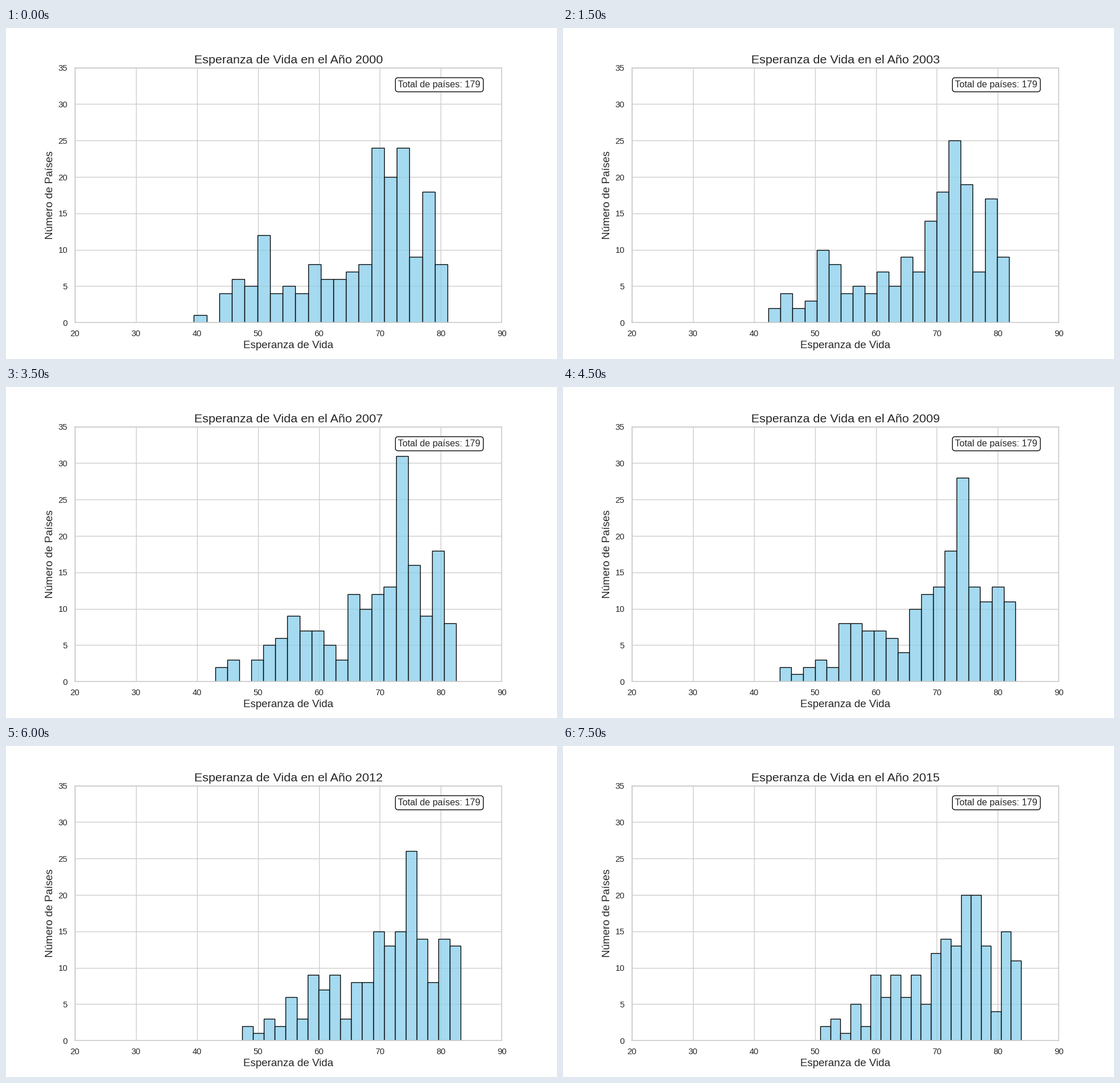
These frames come from a looping animation (966x580 px, 8 s). A matplotlib script:

```python
import matplotlib.pyplot as plt
import numpy as np
from matplotlib.animation import FuncAnimation

WIDTH, HEIGHT, DPI = 966, 580, 96
PT = WIDTH / 10 / DPI  # sizes are given in points for a 10 inch wide chart
FIRST_YEAR, YEARS, BINS, INTERVAL = 2000, 16, 20, 500
INK, GRID = "0.15", "0.8"

# Countries per bin in the surveyed years; the years between are blended.
COUNTS = {
    2000: [1, 0, 4, 6, 5, 12, 4, 5, 4, 8, 6, 6, 7, 8, 24, 20, 24, 9, 18, 8],
    2002: [1, 5, 2, 3, 11, 8, 3, 6, 3, 8, 5, 8, 7, 14, 19, 25, 18, 7, 19, 7],
    2005: [3, 2, 2, 4, 7, 8, 7, 4, 5, 6, 4, 12, 7, 12, 18, 23, 21, 7, 15, 12],
    2007: [2, 3, 0, 3, 5, 6, 9, 7, 7, 5, 3, 12, 10, 12, 13, 31, 16, 9, 18, 8],
    2009: [2, 1, 2, 3, 2, 8, 8, 7, 7, 6, 4, 10, 12, 13, 18, 28, 13, 11, 13, 11],
    2012: [2, 1, 3, 2, 6, 3, 9, 7, 9, 3, 8, 8, 15, 13, 15, 26, 14, 8, 14, 13],
    2015: [2, 3, 1, 5, 2, 9, 6, 9, 6, 9, 5, 12, 14, 13, 20, 20, 13, 4, 15, 11],
}
LOWEST = [39.5, 40.5, 41.5, 42.4, 42.4, 42.5, 42.8, 43.0,
          43.5, 44.2, 45.3, 46.4, 47.4, 48.8, 50.0, 50.9]
HIGHEST = [81.1, 81.4, 81.6, 81.8, 82.0, 81.9, 82.3, 82.5,
           82.6, 82.9, 82.8, 82.6, 83.2, 83.4, 83.6, 83.8]

surveyed = list(COUNTS)
cumulative = np.cumsum(list(COUNTS.values()), axis=1)
total = cumulative[0, -1]


def histogram(year):
    """Return bin edges and counts; blending running totals keeps the sum."""
    running = [round(np.interp(year, surveyed, column)) for column in cumulative.T]
    i = year - FIRST_YEAR
    return np.linspace(LOWEST[i], HIGHEST[i], BINS + 1), np.diff(running, prepend=0)


plt.rcParams.update({
    "font.family": "Liberation Sans",
    "text.color": INK,
    "axes.labelcolor": INK,
})
fig = plt.figure(figsize=(WIDTH / DPI, HEIGHT / DPI), dpi=DPI, facecolor="white")
ax = fig.add_axes([0.125, 0.11, 0.775, 0.77])
ax.set(xlim=(20, 90), ylim=(0, 35), xticks=range(20, 91, 10), yticks=range(0, 36, 5))
ax.set_axisbelow(True)
ax.grid(color=GRID, linewidth=PT)
ax.tick_params(left=False, bottom=False, length=6 * PT, pad=3.5 * PT,
               labelsize=11 * PT, labelcolor=INK)
for spine in ax.spines.values():
    spine.set(edgecolor=GRID, linewidth=1.25 * PT)

ax.set_xlabel("Esperanza de Vida", fontsize=14 * PT, labelpad=4 * PT)
ax.set_ylabel("Número de Países", fontsize=14 * PT, labelpad=4 * PT)
title = ax.set_title("", fontsize=16 * PT, pad=6 * PT)
ax.text(0.95, 0.95, f"Total de países: {total}", transform=ax.transAxes,
        ha="right", va="top", fontsize=12 * PT,
        bbox=dict(boxstyle="round,pad=0.3", facecolor="white",
                  edgecolor="black", linewidth=PT))
bars = ax.bar(range(BINS), [0] * BINS, align="edge",
              facecolor=("skyblue", 0.75), edgecolor="black", linewidth=PT)
ax.set(xlim=(20, 90), ylim=(0, 35))


def update(frame):
    year = FIRST_YEAR + frame
    edges, counts = histogram(year)
    for bar, left, right, count in zip(bars, edges, edges[1:], counts):
        bar.set(x=left, width=right - left, height=count)
    title.set_text(f"Esperanza de Vida en el Año {year}")
    return [*bars, title]


animation = FuncAnimation(fig, update, frames=YEARS, init_func=lambda: update(0),
                          interval=INTERVAL, repeat=True, repeat_delay=0)
plt.show()
```
